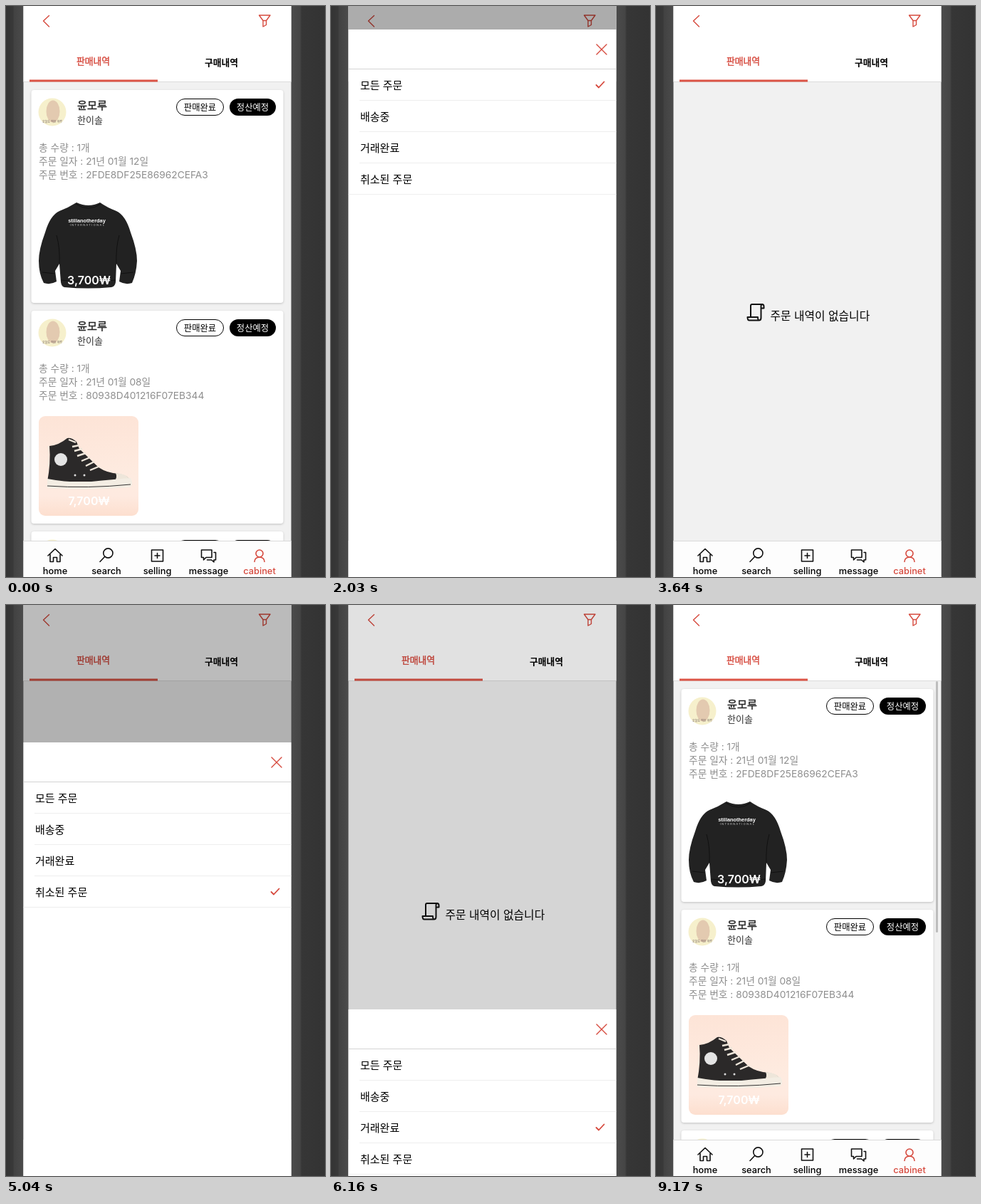
These frames come from a looping animation (448x802 px, 9240 ms). An HTML page:

```html
<!DOCTYPE html>
<html lang="ko">
<head>
<meta charset="utf-8">
<title>Order history filter</title>
<style>
html, body { margin: 0; height: 100%; overflow: hidden; background: #333; }
svg { display: block; width: 448px; height: 802px; }
text { font-family: Inter, "Noto Sans CJK KR", "Noto Sans CJK", sans-serif; white-space: pre; }
.line { fill: none; stroke: #111; stroke-width: 1.6; stroke-linecap: round; stroke-linejoin: round; }
.red { stroke: #d6493d; }
.medium { stroke-width: .4; stroke-linejoin: round; }
.body { fill: #f1f1f1; }
.card { fill: #fff; filter: drop-shadow(0 1px 1.5px #0003); }
.rule { stroke: #c8c8c8; visibility: hidden; }
/* pale fills wash out while the list is shaded */
.flat .body { fill: #fff; }
.flat .pale, .flat .card { visibility: hidden; }
.flat .rule { visibility: visible; }
</style>
</head>
<body>
<svg viewBox="0 0 448 802">
  <defs>
    <linearGradient id="left">
      <stop offset="0" stop-color="#343434"/><stop offset=".4" stop-color="#393939"/>
      <stop offset=".45" stop-color="#424242"/><stop offset="1" stop-color="#4c4c4c"/>
    </linearGradient>
    <linearGradient id="right">
      <stop offset="0" stop-color="#4c4c4c"/><stop offset=".27" stop-color="#454545"/>
      <stop offset=".32" stop-color="#363636"/><stop offset="1" stop-color="#333"/>
    </linearGradient>
    <linearGradient id="peach" x2="0" y2="1">
      <stop offset="0" stop-color="#fde4d7"/><stop offset=".6" stop-color="#feebe0"/>
      <stop offset=".8" stop-color="#feeae0"/><stop offset="1" stop-color="#fddfcf"/>
    </linearGradient>
    <clipPath id="screen"><path d="M24.5 0H400.5V802H24.5Z"/></clipPath>
  </defs>
  <rect width="25" height="802" fill="url(#left)"/>
  <rect x="400" width="48" height="802" fill="url(#right)"/>
  <g clip-path="url(#screen)">
    <g id="page"></g>
    <rect id="shade" width="448" height="802"/>
    <g id="sheet"></g>
  </g>
</svg>
<script>
const $ = id => document.getElementById(id);
const RED = '#d6493d';

// text centred vertically on y
const text = (x, y, size, str, attrs = '') =>
  `<text x="${x}" y="${y + size * 0.37}" font-size="${size}" ${attrs}>${str}</text>`;
const mid = 'text-anchor="middle"';
const medium = color => `class="medium" fill="${color}" stroke="${color}"`;
const line = (d, attrs = 'class="line"') => `<path d="${d}" ${attrs}/>`;
const redLine = d => line(d, 'class="line red" style="stroke-width:1.4"');

const sweater = `
  <path fill="#222" d="M99 276Q116 284 132 276Q142 283 155 288Q168 294 175 318Q184 342 184 358Q183 376 177 389Q168 392 159 387
    L161 372L155 362L154 388Q153 394 148 395Q115 398 82 395Q78 394 77 388L75 362L69 372L71 387Q62 392 53 389
    Q46 376 46 358Q46 342 55 318Q62 294 75 288Q88 283 99 276Z"/>
  <path fill="none" stroke="#111" d="M98 278Q116 290 133 278M75 362Q76 340 71 322M155 362Q154 340 159 322M77 385Q115 389 154 385M51 374L69 376M179 374L161 376"/>
  ${text(113.5, 301, 7.4, 'stillanotherday', `${mid} fill="#fff" style="font:bold 7.4px 'Liberation Sans',sans-serif"`)}
  ${text(114.5, 307.5, 3.8, 'INTERNATIONAL', `${mid} fill="#ccc" letter-spacing="1.5"`)}`;

const shoe = `
  <rect class="pale" x="46" y="266" width="140" height="140" rx="9" fill="url(#peach)"/>
  <path fill="#2b2929" d="M61 308Q74 307 86 297Q92 296 99 302L103 312L130 338Q142 346 158 347Q172 349 175 358H58Q63 332 61 308Z"/>
  <path fill="#eee6da" d="M154 346Q172 347 175 358H152Q157 352 154 346Z"/>
  <path fill="#f3ede3" d="M58 354Q90 360 120 358Q150 355 175 353Q180 362 174 366Q115 371 58 367Z"/>
  <path fill="none" stroke="#333" d="M58 364Q115 368 175 362"/>
  <path fill="none" stroke="#eee6da" stroke-width="2.4" d="M88 299L98 303M93 309L103 307M96 315L107 312M100 322L112 318M106 329L118 324M112 336L124 330M118 342L130 337"/>
  <circle cx="77" cy="327" r="9" fill="#e4e4e4"/>
  <circle cx="97" cy="349" r="1.5" fill="#ddd"/><circle cx="110" cy="349" r="1.5" fill="#ddd"/>`;

function card(dy, date, number, price, picture) {
  const info = ['총 수량 : 1개', `주문 일자 : 21년 01월 ${date}일`, `주문 번호 : ${number}`];
  return `<g transform="translate(0 ${dy})">
    <rect class="card" x="35.5" y="118" width="354" height="299" rx="4"/>
    <path class="rule" d="M40 417.5H386"/>
    <circle class="pale" cx="65" cy="149" r="19.5" fill="#f6f0cc"/>
    <ellipse cx="66" cy="148" rx="9.5" ry="15.5" fill="#e3cab0"/>
    ${text(65, 163, 4, '오늘도 작은 하루', mid + ' fill="#655"')}
    ${text(100, 139, 15.2, '윤모루', medium('#222'))}
    ${text(100, 160, 13, '한이솔', 'fill="#333"')}
    <rect x="239.5" y="130.5" width="66" height="23" rx="11.5" fill="#fff" stroke="#000"/>
    <rect x="314" y="130" width="65" height="24" rx="12"/>
    ${text(272.5, 142.5, 12.3, '판매완료', mid)}
    ${text(346.5, 142.5, 12.3, '정산예정', mid + ' fill="#fff"')}
    ${info.map((s, i) => text(46, 199 + 19 * i, 13.75, s, 'fill="#8e8e8e"')).join('')}
    ${picture}
    ${text(116.5, 385.5, 16, price, mid + ' font-weight="600" fill="#fff"')}
  </g>`;
}

const tabs = [
  ['home', 69, 'M59 772L69 762.5L79 772M62 770V780.5H66.5V774.5H71.5V780.5H76V770'],
  ['search', 141, 'M150 768.5A6.6 6.6 0 1 0 136.8 768.5A6.6 6.6 0 1 0 150 768.5M138.6 773.5L132 780.5'],
  ['selling', 212.5, 'M204.5 764H220.5V780H204.5ZM212.5 768.5V775.5M209 772H216'],
  ['message', 284.5, 'M274.5 764H289V774.5H281L277.5 778V774.5H274.5ZM292 767.5H294.5V778H292V781L288.5 778H282.5'],
  ['cabinet', 356, 'M361 769A5 5 0 1 0 351 769A5 5 0 1 0 361 769M349 780.5C349 772 363 772 363 780.5']
];

$('page').innerHTML = `
  <rect class="body" width="448" height="802"/>
  <g id="list">
    ${card(0, '12', '2FDE8DF25E86962CEFA3', '3,700₩', sweater)}
    ${card(310, '08', '80938D401216F07EB344', '7,700₩', shoe)}
    ${card(620, '08', '', '', '')}
    <rect id="bar" x="393" y="107" width="3" height="353" rx="1.5" fill="#bdbdbd"/>
  </g>
  <g id="empty">
    ${line('M133 437V421Q133 419 135 419H149Q151.5 419 151.5 422V424.5H147.5V438Q147.5 441.5 144.5 441.5H131Q128.5 441.5 128.5 437H143Q143 441.5 145 441.5M147.5 424.5V421.5Q147.5 419 149.5 419', 'class="line" style="stroke-width:2"')}
    ${text(160.5, 435.5, 15.8, '주문 내역이 없습니다')}
  </g>
  <rect width="448" height="106" fill="#fff"/>
  <path class="pale" d="M24 106.5H401" stroke="#dcdcdc"/>
  ${redLine('M60.5 13.5L52.5 21L60.5 29')}
  ${redLine('M355.5 13H371L365.5 20.5V26.5L361 29V20.5ZM361 20.5H365.5')}
  ${text(122.5, 77, 12.8, '판매내역', mid + ' ' + medium(RED))}
  ${text(302.5, 79, 12.8, '구매내역', mid + ' font-weight="700"')}
  <rect x="33" y="103.5" width="180" height="3" fill="#dc5446"/>
  <rect y="751" width="448" height="51" fill="#fdfdfd"/>
  <path d="M24 751.5H401" stroke="#dadada"/>
  ${tabs.map(([name, x, d], i) =>
    line(d, `class="line ${i == 4 ? 'red' : ''}"`) +
    text(x, 793, 12.8, name, `${mid} font-weight="500" fill="${i == 4 ? RED : '#000'}"`)).join('')}`;

const ROW = 44, HEAD = 56;
const options = ['모든 주문', '배송중', '거래완료', '취소된 주문'];
$('sheet').innerHTML = `
  <rect width="448" height="815" fill="#fff"/>
  <path d="M24 ${HEAD - .5}H401" stroke="#d4d4d4"/>
  ${redLine('M373 21L387 35M387 21L373 35')}
  ${options.map((s, i) => `<path d="M${i < 3 ? 40 : 24} ${HEAD + ROW * (i + 1) - .5}H401" stroke="#eee"/>`).join('')}
  <rect id="press" y="${HEAD - .5}" width="448" height="${ROW}" fill="#dfdfdf"/>
  ${options.map((s, i) => text(41, HEAD + ROW * (i + .5), 15, s)).join('')}
  <path id="check" class="line red" style="stroke-width:1.8" d="M372.5 78L376 81.5L383.5 73.5"/>`;

const LOOP = 9240, STEP = 70;
const CLOSED = [3630, 6500];       // list is swapped once the sheet has gone
const show = (id, on) => $(id).setAttribute('visibility', on ? 'inherit' : 'hidden');
const shift = (id, y) => $(id).setAttribute('transform', `translate(0 ${y})`);

function spring(ms) {
  const x = Math.max(0, ms) * 0.02;
  return 1 - (1 + x) * Math.exp(-x);
}

function draw(now) {
  const t = Math.floor(now % LOOP / STEP) * STEP;
  const open = Math.max(0, spring(t - 1788.6) - spring(t - 3180) + spring(t - 4904) - spring(t - 6035.5));
  const empty = t >= CLOSED[0] && t < CLOSED[1];
  const picked = t < 3200 ? 0 : t < 5950 ? 3 : 2;
  const pressed = t >= 3150 && t < 3220 ? 3 : t >= 5950 && t < 6090 ? 2 : -1;

  show('list', !empty);
  show('empty', empty);
  show('bar', t >= CLOSED[1]);
  $('page').setAttribute('class', !empty && open > 0.02 ? 'flat' : '');
  $('shade').setAttribute('opacity', 0.34 * open ** 0.85);
  shift('sheet', Math.round(802 - 807 * open));
  shift('check', ROW * picked);
  show('press', pressed >= 0);
  shift('press', ROW * pressed);
}

const start = performance.now();
(function tick() {
  draw(performance.now() - start);
  requestAnimationFrame(tick);
})();
</script>
</body>
</html>
```
